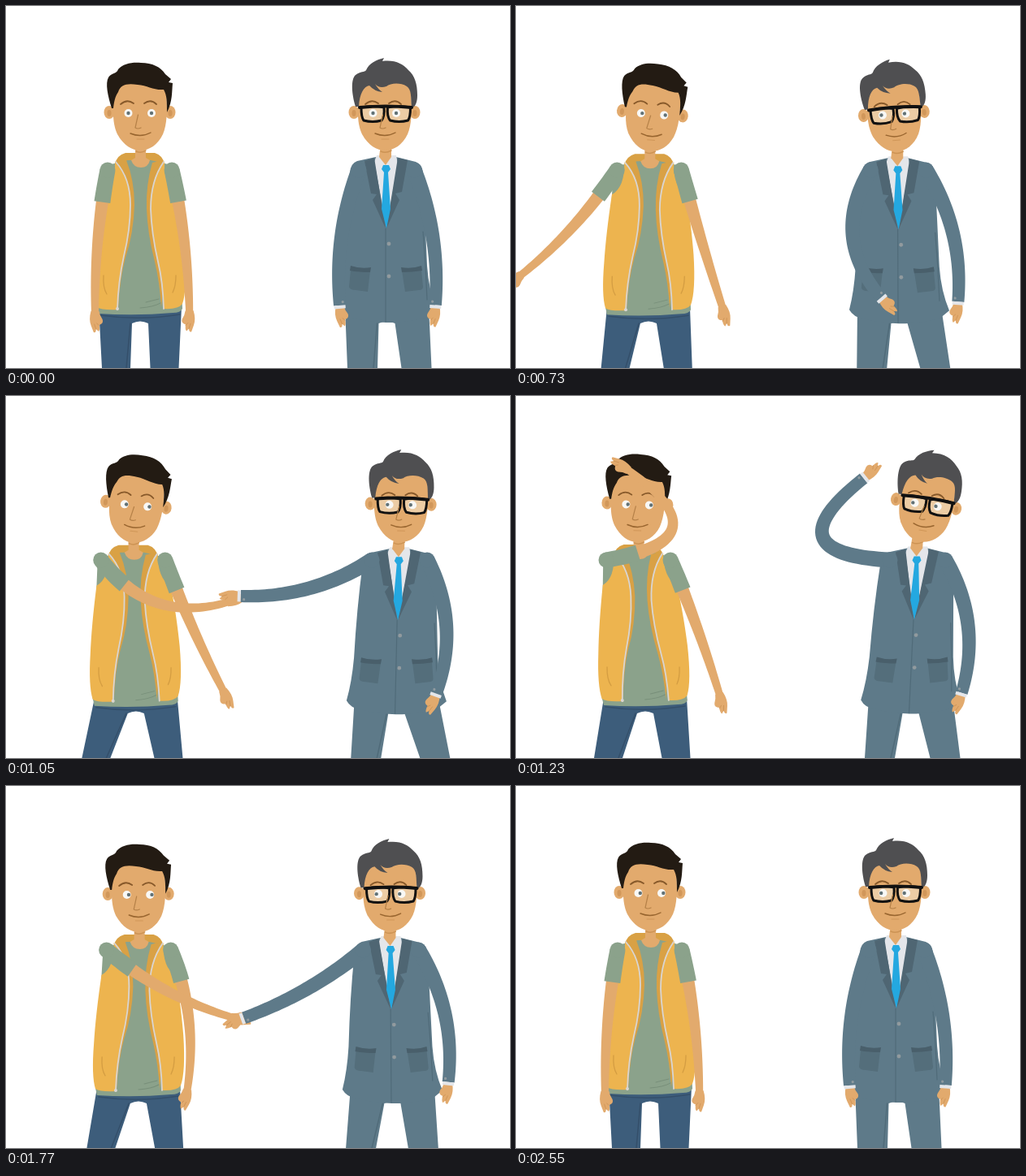
Animation, 620 px wide and 446 px high, one loop 4.4 s. Source, as an HTML page with a canvas:

```html
<!DOCTYPE html>
<html>
<head>
<meta charset="utf-8">
<style>
html, body { margin: 0; width: 100%; height: 100%; overflow: hidden; background: #fff; }
canvas { display: block; }
</style>
</head>
<body>
<canvas id="stage" width="620" height="446"></canvas>
<script>
const g = document.getElementById('stage').getContext('2d');
const LOOP = 4400, START = 500, RAD = Math.PI / 180;
const SKIN = '#e2aa6d', SKIN_DARK = '#c98f52', BROW = '#87592a';
const SUIT = '#5e7a89', SUIT_DARK = '#506b79', SHIRT = '#8ba28b';
const VEST = '#edb44f', LINING = '#d9a145', ZIP = '#d9d5d2';

const fill = (color, d) => { g.fillStyle = color; g.fill(new Path2D(d)); };
const line = (color, width, d) => {
  g.strokeStyle = color;
  g.lineWidth = width;
  g.stroke(new Path2D(d));
};
const oval = (color, x, y, rx, ry = rx) => {
  g.fillStyle = color;
  g.beginPath();
  g.ellipse(x, y, rx, ry, 0, 0, 7);
  g.fill();
};
// Draws in a changed coordinate system and restores it.
const within = (change, paint) => { g.save(); change(); paint(); g.restore(); };

// A pose: hip shift, lean of the neck over the hips, head turn, steps of the
// feet, and each arm as [angle of the wrist, bend] seen from its shoulder.
const poses = (idle, ...changes) => {
  const rest = { shift: 0, lean: 0, turn: 0, feet: [0, 0], ...idle };
  return [{}, ...changes, {}].map(c => Object.values({ ...rest, ...c }).flat());
};
const TIMES = [475, 910, 1230, 1550, 2050, 2550];

const young = {
  poses: poses(
    { left: [95, 6], right: [83, -6] },
    { shift: -4, lean: 1, turn: 8, feet: [-24, 7], left: [91, -7], right: [66, 6] },
    { shift: -6, lean: -8, turn: 2, feet: [-22, 2], left: [-77, 94], right: [70, -3] },
    { shift: -4, feet: [-21, 9], left: [-24, 20], right: [82, -22] },
    { feet: [-14, 0], left: [85, 16] }
  ),
  x: 166, shoulders: [125, 204], armLength: 178, feet: [135.5, 195], footWidth: 35,
  hips: [114, 216], trousers: '#3d5d7b', seam: '#344f6a', look: 1,
  torso: vest, hair: youngHair, arm: bareArm
};
const elder = {
  poses: poses(
    { left: [98, 13], right: [81, -13] },
    { shift: 7, turn: -5, feet: [0, 20], left: [98, 39], right: [87, -23] },
    { shift: 17, lean: 9, turn: 9, feet: [9, 23], left: [252, -93], right: [83, -24] },
    { shift: 13, lean: -1, turn: 1, feet: [-1, 16], left: [204, -34], right: [75.5, -24] },
    { feet: [-1, 0], left: [92.5, 10] }
  ),
  x: 467, shoulders: [434, 502], armLength: 170, feet: [438.5, 505], footWidth: 37,
  hips: [417, 520], trousers: SUIT, seam: SUIT_DARK, look: -1,
  torso: jacket, hair: greyHair, arm: suitArm, glasses: true
};

// Smooth curve through the poses, at rest at both ends.
function poseAt(keys, t) {
  const last = TIMES.length - 1;
  if (t <= TIMES[0]) return keys[0];
  if (t >= TIMES[last]) return keys[last];
  const i = TIMES.findIndex(k => k > t) - 1;
  const span = TIMES[i + 1] - TIMES[i], u = (t - TIMES[i]) / span;
  const slope = (k, j) => k === 0 || k === last ? 0 :
    (keys[k + 1][j] - keys[k - 1][j]) / (TIMES[k + 1] - TIMES[k - 1]);
  return keys[i].map((v, j) => v + (keys[i + 1][j] - v) * u * u * (3 - 2 * u) +
    span * u * (1 - u) * ((1 - u) * slope(i, j) - u * slope(i + 1, j)));
}

// Rises from 0 to 1 and back between two times.
const bump = (t, from, to) =>
  t > from && t < to ? Math.sin(Math.PI * (t - from) / (to - from)) ** 2 : 0;

// Points along an arm of fixed length: the more it bends, the shorter its reach.
function armPoints(x, y, angle, bend, length) {
  const reach = 2 * length - Math.sqrt(length ** 2 + 3 * bend ** 2);
  const cos = Math.cos(angle * RAD), sin = Math.sin(angle * RAD);
  const pts = [];
  for (let n = 0; n <= 40; n++) {
    const u = n / 40, along = reach * u, off = 3 * bend * u * (1 - u);
    pts.push({
      x: x + cos * along - sin * off,
      y: y + sin * along + cos * off,
      a: angle * RAD + Math.atan2(3 * bend * (1 - 2 * u), reach)
    });
  }
  let len = 0;
  pts.forEach((p, i) => {
    if (i) len += Math.hypot(p.x - pts[i - 1].x, p.y - pts[i - 1].y);
    p.len = len;
  });
  return pts;
}

// Tapered limb with a round start and a flat end.
function limb(color, pts, w0, w1) {
  const end = pts.length - 1;
  const edge = (p, i, s) => {
    const w = s * (w0 + (w1 - w0) * i / end);
    g.lineTo(p.x - Math.sin(p.a) * w, p.y + Math.cos(p.a) * w);
  };
  g.fillStyle = color;
  g.beginPath();
  pts.forEach((p, i) => edge(p, i, 1));
  for (let i = end; i >= 0; i--) edge(pts[i], i, -1);
  g.fill();
  oval(color, pts[0].x, pts[0].y, w0);
}

const atWrist = (p, side, paint) => within(() => {
  g.translate(p.x, p.y);
  g.rotate(p.a);
  g.scale(1, side);
}, paint);

function hand() {
  fill(SKIN, 'M-3-5C4-7 10-7 15-5L23-2Q24 1 19 1L22 4Q20 6 14 5Q12 11 7 9Q3 6-3 5Z');
  line(SKIN_DARK, .7, 'M13-1L19 1M12 2L15 5');
}

function bareArm(pts, side) {
  limb(SKIN, pts, 8.5, 4.5);
  atWrist(pts[40], side, hand);
  limb(SHIRT, pts.filter(p => p.len < 44), 9.5, 10);
}

function suitArm(pts, side) {
  atWrist(pts[40], side, () => { g.translate(4, 0); hand(); });
  limb(SUIT, pts, 9.5, 7.5);
  atWrist(pts[40], side, () => {
    fill('#e4e6ea', 'M0-7H4V7H0Z');
    oval('#8f9a9f', -4, 4, 1.6);
  });
}

function legs(man, shift, y, [left, right]) {
  const [h0, h1] = man.hips.map(h => h + shift), w = man.footWidth / 2;
  const mid = (h0 + h1) / 2, l = mid - 10, r = mid + 10;
  fill(man.trousers, `M${h0} ${370 + y}H${h1}L${right + w} 446H${right - w}L${r} 391Q${mid} 386 ${l} 391L${left + w} 446H${left - w}Z`);
  line(man.seam, 1.5, `M${l - 2} 391L${left + w - 5} 446M${h0 + 2} ${381 + y}Q${mid} ${388 + y} ${h1 - 2} ${380 + y}`);
}

function head(man, dx, dy, turn, gaze) {
  within(() => {
    g.translate(man.x + dx, 181 + dy);
    g.rotate(turn * RAD);
    g.translate(-166, -181);
  }, () => {
    for (const x of [127, 202]) {
      oval(SKIN, x, 131, 6.5, 8);
      oval('#d1975a', x, 132, 2.5, 4);
    }
    fill(SKIN, 'M133 105C131 130 131 145 137 158C145 172 155 178 165 178C176 178 187 171 193 158C198 146 199 128 197 105C192 80 138 80 133 105Z');
    man.hair();
    if (man.glasses) glasses();
    for (const x of [150.5, 179]) {
      oval('#f8f8f6', x, 132, 5);
      oval('#627276', x + gaze, 132, 2.2);
    }
    line(BROW, 1.8, 'M141 121Q149 114 157 120M170 120Q178 114 185 121');
    line('#b58148', 1.2, 'M162.500 134L159 150Q162 152 166 150');
    line('#98652f', 1.4, 'M153 157Q166 162.500 178 156');
    line('#cf9658', 1, 'M161 164H170');
  });
}

function glasses() {
  const lens = 'M136 125Q150 122 164 125Q165 136 161 141Q150 144 139 141Q136 137 136 125Z';
  const pane = () => { fill('#ecccA4', lens); line('#111', 3, lens); };
  pane();
  within(() => g.transform(-1, 0, 0, 1, 332.5, 0), pane);
  line('#111', 4, 'M134 125Q166 122 198 125');
}

function youngHair() {
  fill('#231b13', 'M130 126C125 110 122 95 126 88C130 82 136 84 138 78C144 71 155 69 166 70C180 70 190 75 196 84L203 90L200 94L205 95C204 105 205 118 198 131C198 118 198 110 194 103C182 104 174 98 162 97C148 95 141 97 138 106C134 112 133 118 132 126Z');
}

function greyHair() {
  fill('#4f4f51', 'M129 124C124 108 123 90 129 85C135 80 140 82 142 79C145 71 155 66 164 64L162 68C177 66 187 71 194 79C202 86 205 96 205 110C205 118 203 124 198 126C197 112 198 103 192 99C184 94 172 95 167 99Q158 102 153 96Q157 103 162 106Q152 105 146 98C139 99 134 108 133 124Z');
}

function vest() {
  fill(LINING, 'M134 195Q136 184 147 181H183Q193 184 195 195L180 215H150Z');
  fill(SHIRT, 'M121 197L150 190H178L208 197L214 300L217 373Q215 378 205 378Q160 382 114 379L112 370L119 232Z');
  fill(SKIN, 'M159 170H172V187L177 190Q175 199 166 199Q157 199 154 190L159 187Z');
  line('#cc9354', 1.5, 'M160 179Q166 182 172 178');
  // lining, then the two front panels with their zips
  fill(LINING, 'M136 190H148Q158 215 158 245Q157 280 147 310Q140 335 138 372L134 300ZM193 190L180 193Q172 220 173 250Q174 280 183 315Q189 340 191 371L198 300Z');
  const left = 'Q153 212 153 245Q153 275 145 308Q138 340 137 374';
  const right = 'Q178 215 178 250Q179 280 187 315Q193 340 194 373';
  fill(VEST, `M134 191${left}Q118 375 112 371Q107 355 110 315Q112 280 119 231Q135 222 134 191ZM195 191${right}Q212 374 217 367Q223 350 220 305Q216 260 210 231Q194 222 195 191Z`);
  line(ZIP, 1.8, `M135 192${left}M194 192${right}`);
  line('#d49d42', 1.3, 'M120 332Q119 347 124 355M209 332Q209 345 205 353');
  line('#788f7a', 1, 'M165 372Q181 371 190 366M172 365L188 361');
  oval(ZIP, 137, 373, 2);
}

function jacket() {
  fill(SUIT, 'M455 186L432 191Q424 194 423 205Q417 260 415 320Q413 350 407 373Q412 382 424 384Q440 389 468 390Q500 390 519 383L530 374Q520 350 518 320L513 205Q512 195 504 192L480 186Z');
  fill('#e4e6ea', 'M456 184H480L482 195L468 272L453 192Z');
  fill(SKIN, 'M461 170H474V186L467 196L459 186Z');
  line('#cc9354', 1.5, 'M461 179Q467 182 474 178');
  fill('#4f6673', 'M453 187L467 274L451 239L456 232L449 231L441 191ZM482 187L468 274L484 239L479 231L487 229L494 190Z');
  fill('#24a8e0', 'M464 196H471L473 201L470 205L473 250L468 274L462 250L465 205L462 201Z');
  line(SUIT_DARK, 1.2, 'M467 274V389M513 278L516 320L518 362');
  for (const y of [293, 333]) oval('#919a9e', 471, y, 2.4);
  fill('#546e7b', 'M424 325L422 346Q423 350 430 350L445 352L448 326ZM487 326L491 352L508 350Q513 350 513 346L511 325Z');
  fill('#495f6b', 'M424 320Q436 324 449 322L448 328Q434 328 423 326ZM486 322Q500 324 511 320L512 326Q500 328 487 328Z');
}

// swings: extra angle for the left and the right arm
function drawMan(man, t, swings) {
  const [shift, lean, turn, stepL, stepR, ...arms] = poseAt(man.poses, t);
  const feet = [man.feet[0] + stepL, man.feet[1] + stepR];
  const neck = shift + lean, y = Math.max(0, feet[1] - feet[0] - 68) / 8;
  const gaze = man.look * 2.3 * Math.min(1, Math.max(0, (t - TIMES[0]) / 400));
  legs(man, shift, y, feet);
  within(() => g.transform(1, 0, -lean / 188, 1, shift + lean * 378 / 188, y), man.torso);
  head(man, neck * 1.2, y, turn, gaze);
  for (const i of [1, 0]) {
    const angle = arms[2 * i] + swings[i], bend = arms[2 * i + 1];
    man.arm(armPoints(man.shoulders[i] + neck, 202, angle, bend, man.armLength), i ? 1 : -1);
  }
}

function draw(now) {
  const time = now % LOOP, t = time < START ? 0 : time;
  const windUp = bump(t, 475, 910);
  g.fillStyle = '#fff';
  g.fillRect(0, 0, 620, 446);
  drawMan(young, t, [28 * windUp + 10 * bump(t, 2050, 2550), 0]);
  drawMan(elder, t, [0, -9 * windUp]);
  requestAnimationFrame(draw);
}
g.lineCap = g.lineJoin = 'round';
requestAnimationFrame(draw);
</script>
</body>
</html>
```
